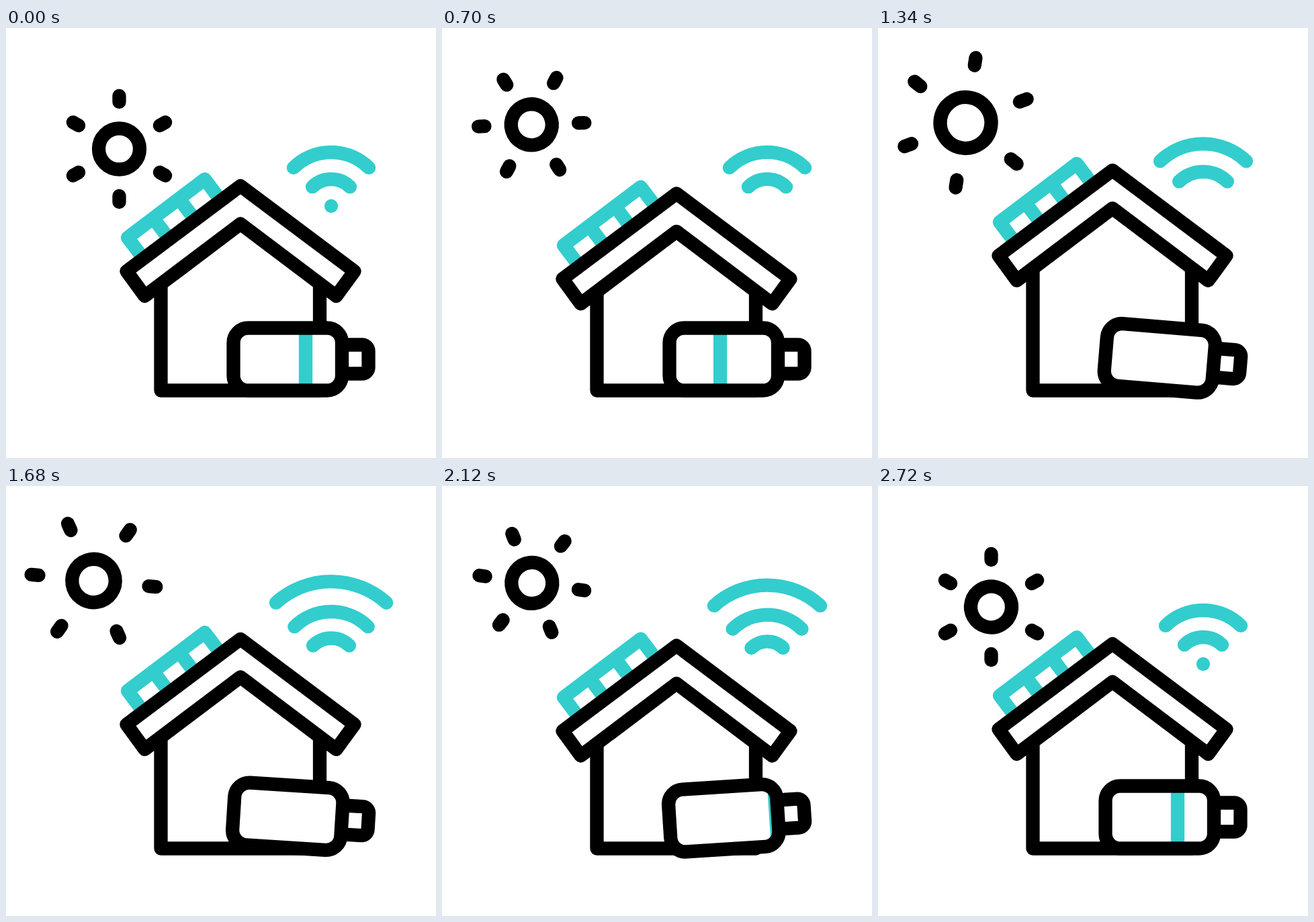
Write an HTML page that moves like this. It is 640x640 px and loops after 3 s.

```html
<!DOCTYPE html>
<html lang="en">
<head>
<meta charset="utf-8">
<title>Smart solar home</title>
<style>
  html, body { margin: 0; height: 100%; overflow: hidden; background: #fff; }
  svg { display: block; width: 100vw; height: 100vh; }
  .ink, .teal { fill: none; stroke: #000; stroke-width: 20.3; stroke-linejoin: round; }
  .teal { stroke: #33cdcd; }
  .round { stroke-linecap: round; }
  .solid { fill: #fff; }
</style>
</head>
<body>
<svg viewBox="0 0 640 640">
  <defs>
    <clipPath id="inside"><rect x="346" y="450" width="147" height="86"/></clipPath>
  </defs>

  <g id="sun" class="ink round">
    <circle id="ring"/>
    <path id="rays"/>
  </g>

  <g class="teal round" transform="translate(484 265)">
    <path id="near"/><path id="mid"/><path id="far"/>
  </g>

  <path class="ink" d="M230.5 350V539.5H467V350"/>
  <g id="roof">
    <path class="teal solid" transform="translate(181 312) rotate(-37.1)"
      d="M0 40V0H144V40M48 0V40M96 0V40"/>
    <path class="ink solid" d="M349 235L518.5 362L491.5 399L349 291.5L206.5 399L179.5 362Z"/>
  </g>

  <g id="battery">
    <path class="ink solid" d="M500 471.5H530a9.5 9.5 0 0 1 9.5 9.5V505a9.5 9.5 0 0 1-9.5 9.5H500"/>
    <rect class="solid" x="338.5" y="446.5" width="161.5" height="93" rx="22"/>
    <g clip-path="url(#inside)">
      <path id="bar" class="teal" d="M446 446V540"/>
    </g>
    <rect class="ink" x="338.5" y="446.5" width="161.5" height="93" rx="22"/>
  </g>
</svg>
<script>
  const LOOP = 3000, START = 200, END = 2700, WAVE = 500;
  const set = (id, name, value) => document.getElementById(id).setAttribute(name, value);

  // Eased 0 to 1 between two times
  function step(t, from, to) {
    const x = Math.min(1, Math.max(0, (t - from) / (to - from)));
    return x * x * (3 - 2 * x);
  }
  // Rise, hold and fall
  const hold = (t, start, top, leave, end) => step(t, start, top) - step(t, leave, end);
  // Rise and fall around one peak
  const hump = (t, start, peak, end) => hold(t, start, peak, peak, end);

  function rays(reach) {
    const half = reach / 16;
    let d = "";
    for (let a = 0; a < 360; a += 60) {
      const s = Math.sin(a * Math.PI / 180), c = -Math.cos(a * Math.PI / 180);
      const inner = reach - half, outer = reach + half;
      d += `M${s * inner} ${c * inner}L${s * outer} ${c * outer}`;
    }
    return d;
  }

  function arc(r, degrees) {
    if (r < 0.01) return "M0 0h.01";
    const a = degrees * Math.PI / 180, x = r * Math.sin(a), y = -r * Math.cos(a);
    return `M${-x} ${y}A${r} ${r} 0 0 1 ${x} ${y}`;
  }

  function drawSun(t) {
    const back = step(t, 2010, 2620);
    const away = step(t, START, 800) - back;
    const spin = 36 * step(t, START, 920) + 24 * back - 29.5 * hump(t, 960, 1420, 1700);
    set("sun", "transform",
      `translate(${168.5 - 38 * away} ${180 - 39 * away}) rotate(${spin})`);
    set("ring", "r", 30.5 + 7.5 * hold(t, 740, 980, 1460, 1780));
    set("rays", "d", rays(74.5 + 17.5 * hold(t, 780, 1070, 1570, 1920)));
  }

  function drawHouse(t) {
    const y = 14 * hump(t, START, 560, 1150) - 23.5 * hump(t, 640, 1300, 1900)
      + 2.5 * hump(t, 1900, 2120, END);
    set("roof", "transform", `translate(0 ${y})`);
  }

  function drawBattery(t) {
    const tilt = 18 * hump(t, 980, 1540, 1890) - 8 * hold(t, 840, 1000, 1900, 2320);
    const x = 72 * hold(t, 700, 1300, 1800, END) - 32 * hump(t, START, 680, 1320);
    set("battery", "transform", `rotate(${tilt} 439 493)`);
    set("bar", "transform", `translate(${x} 0)`);
  }

  // Each wave carries every arc one ring outwards
  function drawWifi(t) {
    const running = t > START && t < END;
    const p = running ? (t - START) % WAVE / WAVE : 0;
    set("near", "d", arc(40 * p, 44.5));
    set("near", "visibility", running && p < 0.34 ? "hidden" : "visible");
    set("mid", "d", arc(40 + 39.5 * p, 44.5));
    set("far", "d", arc(80 + 44.5 * p, 44.5 - 2.6 * p));
  }

  const begin = performance.now();
  function tick() {
    const t = (performance.now() - begin) % LOOP;
    for (const draw of [drawSun, drawHouse, drawBattery, drawWifi]) draw(t);
    requestAnimationFrame(tick);
  }
  tick();
</script>
</body>
</html>
```
